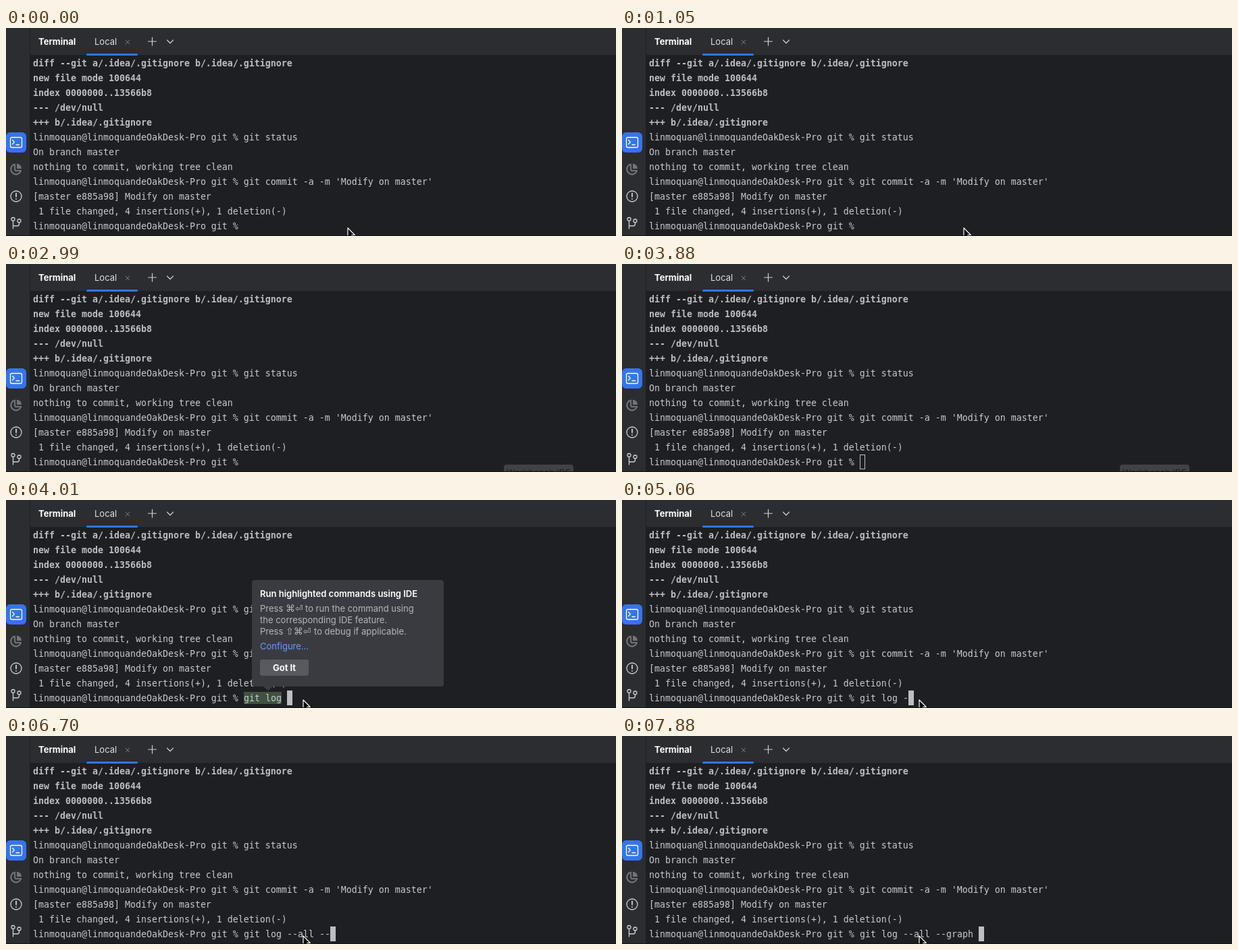
Write an HTML page that moves like this. It is 903 px wide and 309 px high and loops after 8000 ms.

```html
<!DOCTYPE html>
<html lang="en">
<head>
<meta charset="utf-8">
<title>Terminal</title>
<style>
  html, body { margin: 0; width: 100%; height: 100%; overflow: hidden; background: #1e1f22; }
  svg { display: block; }
  text { white-space: pre; }
  .mono { font: 13.29px "DejaVu Sans Mono", monospace; fill: #c8cad0; }
  .ui { font: 13px Inter, sans-serif; fill: #dfe1e5; }
  .sym { font: 14px "DejaVu Sans", sans-serif; }
  .bold { font-weight: 600; }
  .heavy { font-weight: 700; }
  .mono.bold { font-weight: 700; fill: #bcbec4; }
  .white { fill: #fff; }
  .soft text { fill: #b4b7bd; }
  .line { fill: none; stroke: #ced0d6; stroke-width: 1.3; stroke-linecap: round; stroke-linejoin: round; }
</style>
</head>
<body>
<svg width="903" height="309" viewBox="0 0 903 309">
  <rect width="903" height="309" fill="#1e1f22"/>
  <rect width="35" height="309" fill="#2b2d30"/>
  <rect x="36" width="867" height="40" fill="#2b2d30"/>

  <g id="tabs">
    <text class="ui heavy white" x="48" y="25">Terminal</text>
    <text class="ui" x="131" y="25">Local</text>
    <rect x="119" y="38" width="76" height="3" rx="1.5" fill="#3574f0"/>
    <path class="line" style="stroke:#7a7e85;stroke-width:1" d="M177 18l6 6m0-6l-6 6"/>
    <path class="line" style="stroke-width:1.2" d="M216.500 14v12m-6-6h12M238.500 18l4.500 4.500 4.500-4.500"/>
  </g>

  <g id="sidebar">
    <rect y="155" width="30" height="30" rx="6" fill="#3574f0"/>
    <g class="line" style="stroke:#fff">
      <rect x="6.500" y="162.500" width="17" height="15" rx="2"/>
      <path d="M9.500 166.500l3 3-3 3m5.500 1h4.500"/>
    </g>
    <path class="line" style="stroke:#6f737a;stroke-width:2.2" d="M13 202.500a7.500 7.500 0 1 0 9 9.500h-5.500a2.500 2.500 0 0 1-3.500-2.500z"/>
    <path d="M16 201.500a7.500 7.500 0 0 1 7 7.500h-7z" fill="#6f737a"/>
    <circle class="line" cx="15" cy="250" r="8"/>
    <path class="line" style="stroke-width:1.8" d="M15 245.500v5m0 3.500v.1"/>
    <g class="line">
      <circle cx="10.500" cy="284" r="2.500"/>
      <circle cx="19.500" cy="286.500" r="2.500"/>
      <path d="M10.500 286.500v11.500m0-4h6a3 3 0 0 0 3-3V289"/>
    </g>
  </g>

  <g id="log"></g>
  <rect id="mark" x="352" y="285" width="56" height="18" fill="#40523f"/>
  <text id="typed" class="mono" x="352" y="299"></text>
  <rect id="caret"/>

  <g id="hint">
    <path d="M368 119h276a4 4 0 0 1 4 4v150a4 4 0 0 1-4 4H395l-7 6.500-7-6.500h-13a4 4 0 0 1-4-4V123a4 4 0 0 1 4-4z" fill="#393b40"/>
    <text class="ui bold white" x="376" y="144">Run highlighted commands using IDE</text>
    <g class="soft">
      <text class="ui" x="376" y="166">Press</text>
      <text class="sym" x="414" y="166">⌘⏎</text>
      <text class="ui" x="443" y="166">to run the command using</text>
      <text class="ui" x="376" y="183">the corresponding IDE feature.</text>
      <text class="ui" x="376" y="200">Press</text>
      <text class="sym" x="414" y="200">⇧⌘⏎</text>
      <text class="ui" x="456" y="200">to debug if applicable.</text>
    </g>
    <text class="ui" style="fill:#6b9bfa" x="376" y="222">Configure...</text>
    <rect x="376" y="237" width="72" height="24" rx="3" fill="#585a60"/>
    <text class="ui heavy white" x="412" y="254" text-anchor="middle">Got It</text>
  </g>

  <g id="label">
    <rect x="737" y="298" width="103" height="24" rx="4" fill="#414245"/>
    <text class="ui" style="fill:#1b1c1e" x="788.500" y="314.500" text-anchor="middle">Workbench IDE</text>
  </g>

  <path id="pointer" d="M0 0v14.500l3.300-3 2.400 5.300 2.500-1.100-2.300-5.200h4.400z" fill="#000" stroke="#fff" stroke-width="1.200" stroke-linejoin="round"/>
  <rect y="308" width="903" height="1" fill="#141517"/>
</svg>
<script>
const LOOP = 8000;
const $ = id => document.getElementById(id);
const prompt = "linmoquan@linmoquandeOakDesk-Pro git % ";

const rows = [
  "diff --git a/.idea/.gitignore b/.idea/.gitignore",
  "new file mode 100644",
  "index 0000000..13566b8",
  "--- /dev/null",
  "+++ b/.idea/.gitignore",
  prompt + "git status",
  "On branch master",
  "nothing to commit, working tree clean",
  prompt + "git commit -a -m 'Modify on master'",
  "[master e885a98] Modify on master",
  " 1 file changed, 4 insertions(+), 1 deletion(-)",
  prompt
];
rows.forEach((row, i) => {
  const el = document.createElementNS("http://www.w3.org/2000/svg", "text");
  el.setAttribute("class", i < 5 ? "mono bold" : "mono");
  el.setAttribute("x", 40);
  el.setAttribute("y", 57 + 22 * i);
  el.textContent = row;
  $("log").append(el);
});

// Each track lists [start time, value]; a value holds until the next one.
const command = "git log --all --graph ";
const typing = [[0, 0], [4010, 8], [5060, 9], [5210, 10], [5660, 11], [5960, 12], [6110, 13],
  [6260, 14], [6400, 15], [6700, 16], [7140, 17], [7440, 18], [7590, 19], [7740, 21], [7880, 22]];
const carets = [[0, "off"], [150, "on"], [600, "off"], [1200, "on"], [1650, "off"], [2250, "on"],
  [2690, "off"], [3130, "on"], [3730, "off"], [3880, "hollow"], [4010, "on"]];
const moves = [[0, [506, 297]], [1650, [511, 288]], [1800, [526, 279]], [1950, [548, 276]],
  [2100, [573, 286]], [2250, [594, 300]], [2390, [612, 303]], [2540, [628, 306]],
  [2690, null], [4010, [440, 297]]];
const labels = [[0, 0], [2840, 0.5], [2990, 1], [4010, 0]];

const at = (track, t) => track.findLast(step => step[0] <= t)[1];
const show = (id, on) => $(id).setAttribute("visibility", on ? "visible" : "hidden");
const set = (id, attrs) => {
  for (const key in attrs) $(id).setAttribute(key, attrs[key]);
};

function draw(t) {
  const count = at(typing, t), caret = at(carets, t), spot = at(moves, t);
  const hinting = t >= 4010 && t < 5060;
  $("typed").textContent = command.slice(0, count);

  const hollow = caret === "hollow", inset = hollow ? 0.5 : 0;
  set("caret", {
    x: 352 + 8 * count + inset, y: 283 + inset,
    width: 8 - 2 * inset, height: 22 - 2 * inset,
    fill: hollow ? "none" : "#bcbec4", stroke: hollow ? "#bcbec4" : "none"
  });
  show("caret", caret !== "off");
  show("mark", hinting);
  show("hint", hinting);
  set("label", { opacity: at(labels, t) });
  show("pointer", spot);
  if (spot) set("pointer", { transform: `translate(${spot})` });
}

const start = performance.now();
function tick() {
  draw((performance.now() - start) % LOOP);
  requestAnimationFrame(tick);
}
tick();
</script>
</body>
</html>
```
